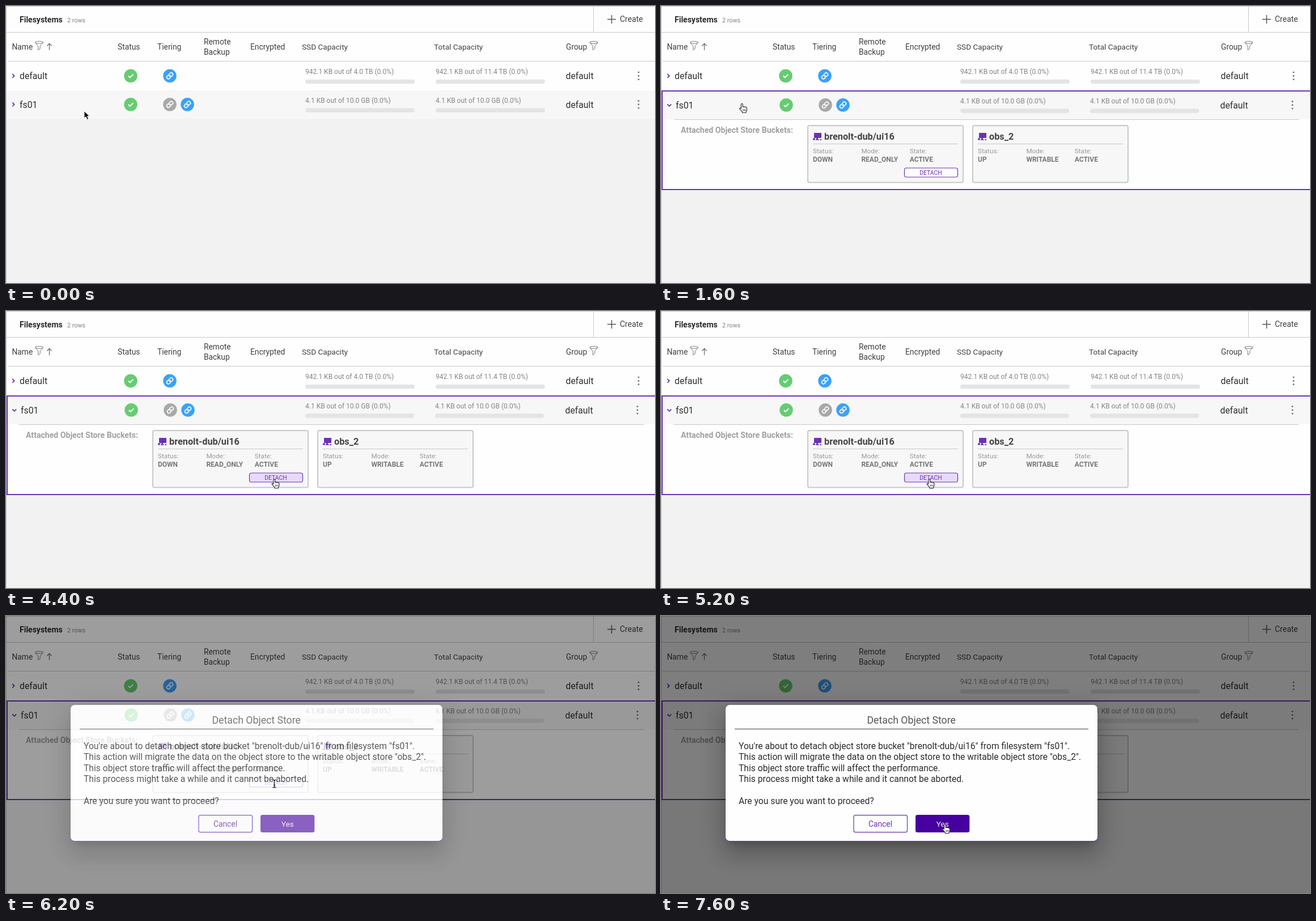
These frames come from a looping animation (1145x489 px, 8000 ms). An HTML page:

```html
<!DOCTYPE html>
<html lang="en">
<head>
<meta charset="utf-8">
<title>Filesystems</title>
<style>
html, body { margin: 0; width: 100%; height: 100%; overflow: hidden; background: #f2f2f2; }
svg { display: block; width: 100%; height: 100%; font-family: Roboto, "Open Sans", sans-serif; }
</style>
</head>
<body>
<svg id="stage" viewBox="0 0 1145 489"></svg>
<script>
const LOOP = 8000, TICK = 200;
const OPEN_AT = 1400, MODAL_AT = 6200;
const PURPLE = '#6a33b3', GREEN = '#66cc72', BLUE = '#3ba1f8', GRAY = '#a8a8a8', RULE = '#c8c8c8';
const BUCKET = 'brenolt-dub/ui16';

const text = (x, y, s, size = 13.8, fill = '#404040', attrs = '') =>
  `<text x="${x}" y="${y}" font-size="${size}" fill="${fill}" ${attrs}>${s}</text>`;
const bold = (x, y, s, size, fill) => text(x, y, s, size, fill, 'font-weight="700"');
const mid = (x, y, s, size, fill) => text(x, y, s, size, fill, 'text-anchor="middle"');
const rect = (x, y, w, h, fill, attrs = '') =>
  `<rect x="${x}" y="${y}" width="${w}" height="${h}" fill="${fill}" ${attrs}/>`;
const stroke = (d, color = RULE, width = 1, attrs = '') =>
  `<path d="${d}" fill="none" stroke="${color}" stroke-width="${width}" ${attrs}/>`;
const at = (x, y, s) => `<g transform="translate(${x} ${y})">${s}</g>`;
const ROUND = 'stroke-linecap="round" stroke-linejoin="round"';

const disc = (x, y, fill, mark) => at(x, y, `<circle r="11.8" fill="${fill}"/>${mark}`);
const check = (x, y) => disc(x, y, GREEN, stroke('M-4.2 .2L-1.3 3.1L4.4-2.7', '#fff', 2));

function link(x, y, fill) {
  const half = 'M-1.5-2.9H-3.6a2.9 2.9 0 0 0 0 5.8h1.8a2.9 2.9 0 0 0 2.9-2.9';
  const ring = stroke(half, '#fff', 1.6, ROUND);
  return disc(x, y, fill, `<g transform="rotate(-45)">${ring}<g transform="rotate(180)">${ring}</g></g>`);
}

const funnel = (x, y) => at(x, y,
  stroke('M-7.2-5.6L-1.7 1V8L1.7 5.4V1L7.2-5.6', '#777') +
  '<ellipse cy="-5.6" rx="7.2" ry="1.9" fill="none" stroke="#777"/>');

const dots = (x, y) => [-6.3, 0, 6.3].map(d => `<circle cx="${x}" cy="${y + d}" r="1.5" fill="#777"/>`).join('');

const capacity = (x, y, s, w) =>
  text(x, y - 3, s, 12, '#858585') + rect(x, y + 6.5, w, 7.5, '#e4e4e4', 'rx="3.7"');

function row(y, name, ssd, total, links, open) {
  const dx = open ? 2 : 0, w = open ? 192 : 193;
  return stroke(open ? `M11.3 ${y - 1.3}l3.4 3.3l3.4-3.3` : `M11.2 ${y - 3.4}l3.4 3.4l-3.4 3.4`, PURPLE, 1.8) +
    text(24 + dx, y + 5.7, name, 15.8, '#2f2f2f') +
    check(220 + dx / 2, y) +
    links.map((c, i) => link(289 + dx / 2 + i * 31, y, c)).join('') +
    capacity(528, y, ssd, w) + capacity(758 - dx / 2, y, total, w) +
    text(987.5 - dx / 2, y + 5.7, 'default', 15.8, '#2f2f2f') + dots(1116 - dx, y);
}
const fsRow = (y, open) =>
  row(y, 'fs01', '4.1 KB out of 10.0 GB (0.0%)', '4.1 KB out of 10.0 GB (0.0%)', [GRAY, BLUE], open);

function card(x, name, values) {
  const icon = rect(11, 13, 13, 9, PURPLE) + rect(9, 22.5, 4, 3, PURPLE) +
    rect(15, 22, 3, 3, PURPLE) + rect(14, 24.5, 6, 1.3, PURPLE) + rect(21.5, 24, 2.5, 2, PURPLE);
  return at(x, 211,
    rect(0, 0, 274, 100.5, '#f7f7f8', 'rx="3" stroke="#c9c9c9" stroke-width="2"') + icon +
    bold(29, 25, name, 16.3, '#444') + stroke('M9 32.5H265') +
    ['Status:', 'Mode:', 'State:'].map((label, i) =>
      text(9 + i * 85.4, 49, label, 11.7, '#999') + bold(9 + i * 85.4, 63.5, values[i], 12, '#777')).join(''));
}

const page =
  rect(0, 0, 1145, 489, '#f2f2f2') + rect(1, 1, 1144, 148, '#fefefe') +
  stroke('M0 .5H1145M.5 0V489M1 46.5H1145M1036.5 0V46M3 97.5H1145') +
  bold(24, 29, 'Filesystems', 14, '#2a2a2a') + text(108, 29, '2 rows', 10.8, '#808080') +
  stroke('M1061 23.5H1076M1068.5 16V31', '#555', 1.5) + text(1083, 28, 'Create', 14) +
  text(10.5, 77, 'Name') + funnel(58.5, 69.8) +
  stroke('M76.5 78V66.5M72.5 70.5L76.5 66.2L80.5 70.5', '#666', 1.2) +
  text(197, 77, 'Status') + text(267, 77, 'Tiering') +
  text(349, 68, 'Remote') + text(349, 85.5, 'Backup') + text(431, 77, 'Encrypted') +
  text(522, 77, 'SSD Capacity', 13.6) + text(755, 77, 'Total Capacity', 13.6) +
  text(988, 77, 'Group') + funnel(1037, 69.8) +
  row(123.3, 'default', '942.1 KB out of 4.0 TB (0.0%)', '942.1 KB out of 11.4 TB (0.0%)', [BLUE]);

const closed = rect(1, 149, 1144, 50, '#f7f7f8') + fsRow(173.8);

const opened =
  rect(2, 150, 1150, 174, '#fefefe', `stroke="${PURPLE}" stroke-width="2"`) +
  rect(3, 151, 1142, 49, '#f7f7f8') + stroke('M23 200.5H1125') + fsRow(174.8, true) +
  bold(35, 224, 'Attached Object Store Buckets:', 14.1, '#a0a0a0') +
  card(259, BUCKET, ['DOWN', 'READ_ONLY', 'ACTIVE']) + card(550, 'obs_2', ['UP', 'WRITABLE', 'ACTIVE']) +
  rect(429.5, 286, 94, 16, '#fefefe', `id="detach" rx="3.5" stroke="${PURPLE}" stroke-width="1.2"`) +
  mid(476, 298, 'DETACH', 10.4, PURPLE);

const shadow = (dy, blur, spread, alpha) =>
  rect(114 - spread, 157 + dy - spread, 656 + 2 * spread, 241 + 2 * spread, '#000',
    `rx="8" opacity="${alpha}" style="filter:blur(${blur / 2}px)"`);

const message = [
  `You're about to detach object store bucket "${BUCKET}" from filesystem "fs01".`,
  'This action will migrate the data on the object store to the writable object store "obs_2".',
  'This object store traffic will affect the performance.',
  'This process might take a while and it cannot be aborted.',
  '',
  'Are you sure you want to proceed?'
];

const modal =
  rect(0, 0, 1145, 489, '#000', 'opacity=".5"') +
  shadow(11, 15, -7, .2) + shadow(24, 38, 3, .14) + shadow(9, 46, 8, .12) +
  rect(114, 157, 656, 241.5, PURPLE, 'rx="7"') + rect(114, 157, 656, 240, '#fefefe', 'rx="7"') +
  mid(441.7, 190, 'Detach Object Store', 17.7, '#555') + stroke('M130 199.5H754', '#444') +
  message.map((s, i) => text(137, 234.8 + i * 19.4, s, 15.67, '#2b2b2b')).join('') +
  rect(340, 351.7, 94.5, 30, '#fefefe', `rx="3" stroke="${PURPLE}" stroke-width="1.2"`) +
  mid(387, 371.7, 'Cancel', 13.8, PURPLE) +
  rect(449, 351, 95.3, 31, PURPLE, 'id="yes" rx="3.5"') + mid(496.7, 371.7, 'Yes', 13.6, '#f4effa');

const cursors = {
  arrow: '<path d="M0 0V12.6L3 9.9L5.3 15L7.6 14L5.4 9.1H9.2Z" fill="#000" stroke="#fff" stroke-width=".9"/>',
  hand: '<path d="M-1.6 9V1.6a1.4 1.4 0 0 1 2.8 0V6q1.3-.9 2.5.2q1.4-.8 2.4.4q1.9-.5 2.2 1.4V11.5' +
    'q0 2-1.3 3.4V16.3H.4V14.8L-4.3 9.6q-.1-2 1.4-1.6Z" fill="#fff" stroke="#222" stroke-width="1.1"/>' +
    stroke('M1.8 10.3v3M3.8 10.3v3M5.8 10.3v3', '#222', .9),
  beam: stroke('M-3.2-6.8Q0-7 0-5V5Q0 7-3.2 6.8M3.2-6.8Q0-7 0-5M0 5Q0 7 3.2 6.8M-1.6 2.5H1.6', '#111', 1.2)
};

const group = (id, s) => `<g id="${id}">${s}</g>`;
const stage = document.getElementById('stage');
stage.innerHTML = page + group('closed', closed) + group('opened', opened) + group('modal', modal) +
  group('pointer', Object.entries(cursors).map(([id, s]) => group(id, s)).join(''));
const $ = id => document.getElementById(id);
const show = (id, on) => $(id).setAttribute('display', on ? 'inline' : 'none');

// Pointer path: time, x, y
const path = [
  [0, 138, 185.5], [200, 138, 185.5], [1000, 143, 172], [2800, 143, 172],
  [4200, 473.5, 296.5], [6800, 473.5, 296], [7400, 501, 367.5], [LOOP, 501, 367.5]
];
const ease = u => u * u * (3 - 2 * u);

function position(t) {
  const i = path.findIndex(p => p[0] > t);
  const [t0, x0, y0] = path[i - 1], [t1, x1, y1] = path[i];
  const u = ease((t - t0) / (t1 - t0));
  return [x0 + (x1 - x0) * u, y0 + (y1 - y0) * u];
}
const inside = (x, y, l, t, r, b) => x >= l && x <= r && y >= t && y <= b;

function draw(time) {
  const t = Math.floor(time % LOOP / TICK) * TICK;
  const [x, y] = position(t);
  const inModal = t >= MODAL_AT;
  const onDetach = !inModal && inside(x, y, 429, 286, 524, 302);
  const onYes = inModal && inside(x, y, 449, 351, 544, 382);

  show('closed', t < OPEN_AT);
  show('opened', t >= OPEN_AT);
  show('modal', inModal);
  $('modal').setAttribute('opacity', t < MODAL_AT + TICK ? .76 : 1);
  $('detach').setAttribute('fill', onDetach ? '#e8dafb' : '#fefefe');
  $('yes').setAttribute('fill', onYes ? '#4700a0' : PURPLE);

  let kind = 'arrow';
  if (onDetach || onYes || (!inModal && t >= 800 && y < 200)) kind = 'hand';
  else if (inModal && y < 336) kind = 'beam';
  for (const id in cursors) show(id, id === kind);
  $('pointer').setAttribute('transform', `translate(${x} ${y})`);
}

function loop() {
  draw(performance.now());
  requestAnimationFrame(loop);
}
loop();
</script>
</body>
</html>
```
